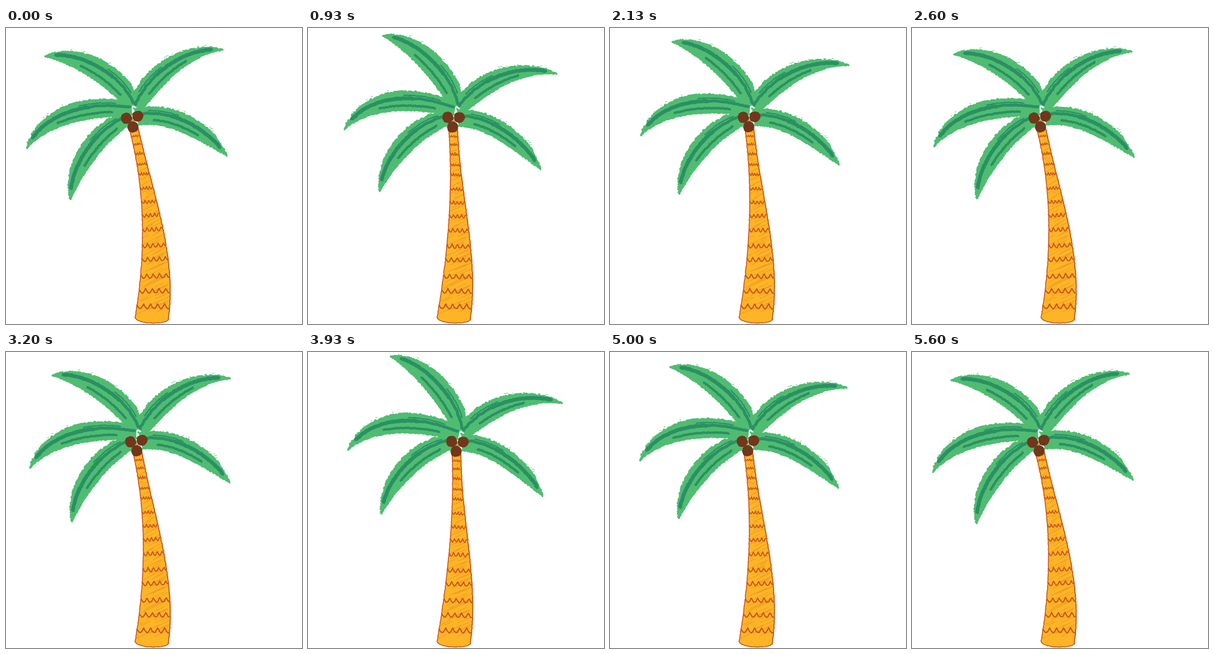
Recreate the animation shown at these times as an HTML page with a canvas. Size 500 px wide and 500 px high, loop 5660 ms.

```html
<!DOCTYPE html>
<html lang="en">
<head>
<meta charset="utf-8">
<title>Swaying palm</title>
<style>
  html, body { margin: 0; width: 100%; height: 100%; overflow: hidden; background: #fff; }
  canvas { display: block; }
</style>
</head>
<body>
<canvas id="stage" width="500" height="500"></canvas>
<script>
const ctx = document.getElementById('stage').getContext('2d');
const GREEN = '#50bc71', DARK = '#2a9064', ORANGE = '#fdb526', HATCH = '#ef9724',
      RUST = '#c6531b', BROWN = '#71371a';
const LOOP = 5660, AXIS = 230, BASE = 490;

let seed = 11;
const rand = () => (seed = seed * 16807 % 2147483647) / 2147483647;
const jitter = a => (rand() * 2 - 1) * a;
const range = (n, f) => Array.from({ length: n }, (_, i) => f(i));

// Point at t on the cubic that passes through four points at even steps.
function at([a, b, c, d], t) {
  const u = 3 * t - 1, v = 3 * t - 2, w = t - 1;
  return [0, 1].map(k =>
    (-u * v * w * a[k] + 9 * t * v * w * b[k] - 9 * t * u * w * c[k] + t * u * v * d[k]) / 2);
}
const roughen = ([x, y], a) => [x + jitter(a), y + jitter(a)];
const sample = (n, f, rough) => range(n + 1, i => roughen(f(i / n), rough));

// Everything is described upright, then bent along a circular arc.
let bendAmount = 0;
function bend([x, y]) {
  const a = bendAmount * Math.max(0, BASE - y), c = Math.cos(a), s = Math.sin(a);
  return [AXIS + (1 - c) / bendAmount + (x - AXIS) * c,
          (y > BASE ? y : BASE - s / bendAmount) + (x - AXIS) * s];
}

function trace(points) {
  ctx.beginPath();
  for (const p of points) ctx.lineTo(...bend(p));
}
function fill(points, color) {
  trace(points);
  ctx.fillStyle = color;
  ctx.fill();
}
function stroke(points, color, width) {
  trace(points);
  ctx.strokeStyle = color;
  ctx.lineWidth = width;
  ctx.stroke();
}

// Upper edge from root to tip, then the lower edge, which ends at the same tip.
const leaves = [
  [[[248, 128], [225, 73], [171, 31], [107, 23]], [[230, 136], [196, 92], [154, 53]]],
  [[[236, 128], [278, 79], [340, 56], [403, 63]], [[252, 141], [297, 103], [345, 75]]],
  [[[238, 128], [167, 112], [98, 128], [52, 181]], [[236, 146], [171, 143], [107, 151]]],
  [[[232, 138], [170, 164], [128, 215], [117, 279]], [[236, 158], [188, 190], [148, 232]]],
  [[[240, 137], [301, 146], [353, 179], [386, 230]], [[244, 164], [296, 175], [343, 201]]]
].map(([upper, lower]) => {
  lower = [...lower, upper[3]];
  const vein = (width, across, from, to) => ({
    width,
    points: sample(50, t => {
      const s = from + t * (to - from), a = at(upper, s), b = at(lower, s);
      return a.map((p, k) => p + (b[k] - p) * across);
    }, 0.6)
  });
  const top = sample(95, t => at(upper, t), 1.4);
  return {
    shape: [...top, ...sample(95, t => at(lower, 1 - t), 0.9)],
    veins: [vein(5, 0.36, 0.02, 0.9), vein(6.3, 0.36, 0.35, 0.89),
            vein(4, 0.75, 0.17, 0.64), vein(2, 0.2, 0.13, 0.42)],
    crumbs: top.slice(40, 88).filter(() => rand() < 0.15).map(([x, y]) => {
      const h = y - 3 - rand() * 2;
      return [[x, h], [x + 1 + rand() * 3, h]];
    })
  };
});

const leftEdge = [[228, 168], [236, 275], [232, 382], [218, 489]];
const rightEdge = [[243, 166], [258.5, 275], [275, 384], [274, 493]];
const left = sample(160, t => at(leftEdge, t), 0.4);
const right = sample(160, t => at(rightEdge, t), 0.4);
const foot = sample(30, t => at([leftEdge[3], [233, 497], [258, 498], rightEdge[3]], t), 0.3);
const trunk = [...left, ...foot, ...right.slice().reverse()];
const edgeAt = (edge, y) => edge.find(p => p[1] >= y)[0];

const hatches = range(105, i => {
  const y = 176 + i * 2.95 + jitter(2), x0 = edgeAt(left, y), w = edgeAt(right, y) - x0;
  const x = x0 + rand() * w * 0.65, len = w * (0.25 + rand() * 0.5);
  return [[x, y], [x + len, y - len * 0.45]];
});

const rings = [182, 196, 212, 230, 247, 271, 294, 317, 341, 368, 391, 419, 444, 470].map((y, i) => {
  const x0 = edgeAt(left, y) + 1, w = edgeAt(right, y) - x0 - 1;
  const bumps = 3.5 + i * 0.08, high = 4 + i * 0.33;
  const line = range(Math.ceil(w), d => {
    const wave = Math.abs(Math.sin((d / w * bumps + 0.1) * Math.PI));
    return [x0 + d, y - high / 2 + high * wave + jitter(0.6)];
  });
  return { line, width: 1.3 + i * 0.055 };
});

const nuts = [[225.5, 151], [245, 150], [234.5, 167]].map(([x, y]) =>
  range(24, i => {
    const a = i / 12 * Math.PI, r = 9.4 + jitter(0.5);
    return [x + r * Math.cos(a), y + r * Math.sin(a)];
  }));

function draw(time) {
  bendAmount = -44 * Math.cos(time / LOOP * 4 * Math.PI) / 337 ** 2 || 1e-9;
  ctx.clearRect(0, 0, 500, 500);
  ctx.lineCap = ctx.lineJoin = 'round';

  fill(trunk, ORANGE);
  ctx.save();
  ctx.clip();
  for (const h of hatches) stroke(h, HATCH, 1);
  for (const r of rings) stroke(r.line, RUST, r.width);
  ctx.restore();
  stroke([...left, ...foot], RUST, 1.5);
  stroke(right, RUST, 1.8);

  for (const { shape, crumbs } of leaves) {
    fill(shape, GREEN);
    stroke(shape, GREEN, 3);
    for (const c of crumbs) stroke(c, GREEN, 0.8);
  }
  for (const { veins } of leaves) for (const v of veins) stroke(v.points, DARK, v.width);

  for (const n of nuts) fill(n, BROWN);
  stroke([[234, 156], [234.5, 156.5]], '#d99a35', 2);
}

// Thirty pictures a second, the second of every six held over.
function frame(now) {
  const t = now % LOOP, part = t % 200;
  draw(t - part + [170, 130, 100, 70, 0].find(s => part >= s));
  requestAnimationFrame(frame);
}
requestAnimationFrame(frame);
</script>
</body>
</html>
```
